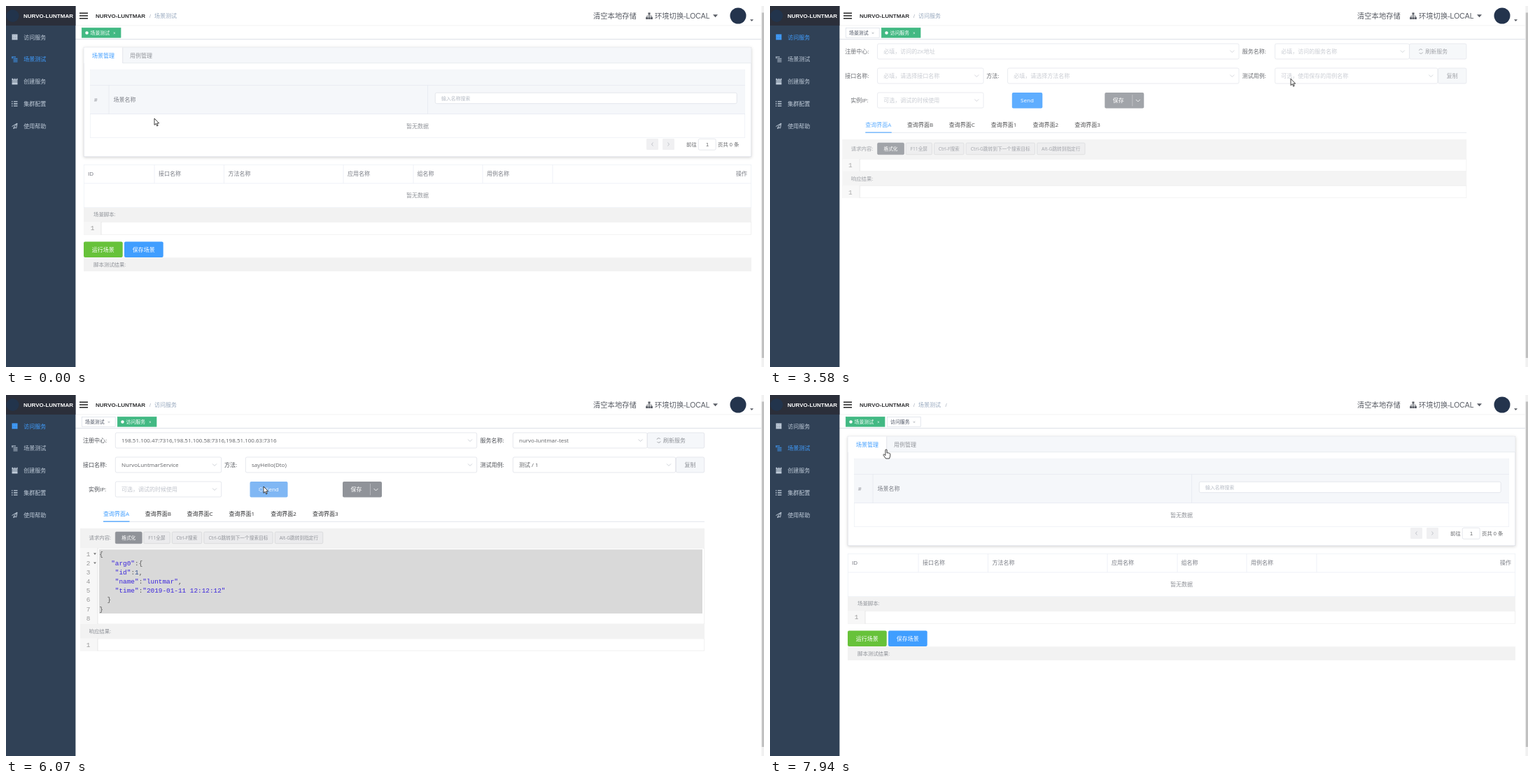
Animation of 1083x517 px, one loop 8 s. Source, as an HTML page:

```html
<!DOCTYPE html>
<html lang="zh-CN">
<head>
<meta charset="utf-8">
<title>场景测试</title>
<style>
html, body { margin: 0; width: 100%; height: 100%; overflow: hidden; background: #fff; }
svg { display: block; width: 100%; height: 100%; }
text { white-space: pre; }
.sans { font-family: "Liberation Sans", "Noto Sans CJK SC", "Noto Sans CJK", sans-serif; }
.form { font-family: "Open Sans", "Noto Sans CJK SC", "Noto Sans CJK", sans-serif; }
.mono { font-family: "Liberation Mono", monospace; }
</style>
</head>
<body>
<svg id="stage" viewBox="0 0 1083 517"></svg>
<script>
const NS = 'http://www.w3.org/2000/svg';
const LOOP = 8000, STEP = LOOP / 103;
const BLUE = '#409eff', GREY = '#909399', TEXT = '#606266', HINT = '#c0c4cc';
const LINE = '#ebeef5', BORDER = '#dcdfe6', PANEL = '#f2f2f2', PALE = '#f5f7fa';
const BRAND = 'NURVO-LUNTMAR';
const stage = document.getElementById('stage');

function el(tag, parent, attrs = {}) {
  const node = document.createElementNS(NS, tag);
  for (const k in attrs) node.setAttribute(k, attrs[k]);
  return parent.appendChild(node);
}
const group = (p, attrs) => el('g', p, attrs);
// Box given by its edges.
const box = (p, x1, y1, x2, y2, fill, attrs) =>
  el('rect', p, { x: x1, y: y1, width: x2 - x1, height: y2 - y1, fill, ...attrs });
const framed = (p, x1, y1, x2, y2, fill, stroke, rx = 0) =>
  box(p, x1 + .3, y1 + .3, x2 - .3, y2 - .3, fill, { stroke, 'stroke-width': .7, rx });
const path = (p, d, stroke, w = .8, attrs) =>
  el('path', p, { d, stroke, fill: 'none', 'stroke-width': w, ...attrs });
const solid = (p, d, fill) => el('path', p, { d, fill });
// Text whose vertical middle is y.
function label(p, x, y, str, size = 8, fill = TEXT, attrs) {
  const t = el('text', p, { x, y: y + size * .37, 'font-size': size, fill, ...attrs });
  t.textContent = str;
  return t;
}
const MID = { 'text-anchor': 'middle' }, END = { 'text-anchor': 'end' };
const show = (node, on) => node.setAttribute('display', on ? 'inline' : 'none');
const clamp = v => Math.max(0, Math.min(1, v));
const easeOut = v => 1 - Math.pow(1 - clamp(v), 2.4);
const cross = (p, x, y, stroke) =>
  path(p, `M${x - 1.2} ${y - 1.2}l2.4 2.4m0-2.4l-2.4 2.4`, stroke, .6);
const chevron = (p, x, y, dir = 1, stroke = HINT) =>
  path(p, `M${x - 3} ${y - 1.5 * dir}l3 ${3 * dir}l3 ${-3 * dir}`, stroke, .8);
const sideways = (p, x, y, dir, stroke = HINT) =>
  path(p, `M${x - dir} ${y - 2.5}l${2 * dir} 2.5l${-2 * dir} 2.5`, stroke, .8);

const defs = el('defs', stage);
const shadow = el('filter', defs, { id: 'soft', x: '-10%', y: '-10%', width: '120%', height: '130%' });
el('feDropShadow', shadow, { dx: 0, dy: 1, stdDeviation: 2, 'flood-color': '#000', 'flood-opacity': .18 });

/* ---------- scene page ---------- */
const scenePage = group(stage, { class: 'sans' });
(function buildScene(p) {
  const head = '#7b7e86';
  box(p, 111, 59, 1065, 216, '#fff', { filter: 'url(#soft)' });
  framed(p, 111, 59, 1065, 216, '#fff', BORDER);
  box(p, 111.6, 59.6, 1064.4, 82, PALE);
  path(p, 'M167 81.7H1064.5', '#e4e7ed');
  box(p, 111.6, 59.6, 166.6, 82, '#fff');
  path(p, 'M166.7 59.5V82', BORDER, .7);
  label(p, 123, 71, '场景管理', 8, BLUE);
  label(p, 177, 71, '用例管理', 8, GREY);

  framed(p, 120, 91, 1056, 189, '#fff', LINE);
  box(p, 120.5, 91.5, 1055.5, 154.6, PALE);
  path(p, 'M120 113.6H1056M120 154.6H1056M147 113.6V154.6M602.5 113.6V154.6', '#e6e9f0', .8);
  label(p, 126, 134, '#', 8, head);
  label(p, 153.5, 134, '场景名称', 8, head);
  framed(p, 613, 124, 1044.5, 140, '#fff', BORDER, 2);
  label(p, 622, 132, '输入名称搜索', 6.9, '#b4bac4');
  label(p, 588, 172, '暂无数据', 8, GREY, MID);
  for (const [x, dir] of [[915, -1], [938, 1]]) {
    box(p, x, 190, x + 17, 206, '#f0f0f2', { rx: 1 });
    sideways(p, x + 8.5, 198, dir, '#b4b8c0');
  }
  label(p, 972, 198.5, '前往', 7.4);
  framed(p, 989, 190, 1014.5, 206.5, '#fff', BORDER, 2);
  label(p, 1002, 198.5, '1', 7.4, TEXT, MID);
  label(p, 1017, 198, '页共 0 条', 7.4);

  framed(p, 111, 227, 1065, 289, '#fff', LINE);
  path(p, 'M111 254H1065' + [212, 311.5, 482, 582, 681, 781].map(x => `M${x} 227V254`).join(''), LINE);
  [[117, 'ID'], [218, '接口名称'], [317.5, '方法名称'], [488, '应用名称'], [587.5, '组名称'], [687, '用例名称']]
    .forEach(([x, s]) => label(p, x, 240.5, s, 8, head));
  label(p, 1059, 240.5, '操作', 8, head, END);
  label(p, 588, 271.5, '暂无数据', 8, GREY, MID);

  box(p, 111, 289, 1065, 309, PANEL);
  label(p, 125, 298.5, '场景脚本:', 7.4, GREY);
  editor(p, 111, 309, 1065, 327.5);
  lineNumber(p, 123.5, 318, 1);
  box(p, 111, 337.5, 166.7, 360, '#67c23a', { rx: 2 });
  label(p, 138.8, 349, '运行场景', 8, '#fff', MID);
  box(p, 169, 337.5, 224.7, 360, BLUE, { rx: 2 });
  label(p, 196.8, 349, '保存场景', 8, '#fff', MID);
  box(p, 111, 360.3, 1065, 380, PANEL);
  label(p, 125, 370, '脚本测试结果:', 7.4, GREY);
})(scenePage);

function editor(p, x1, y1, x2, y2) {
  framed(p, x1, y1, x2, y2, '#fff', '#ebebeb');
  box(p, x1, y1, x1 + 25, y2, '#f7f7f7');
  path(p, `M${x1 + 25} ${y1}V${y2}`, '#ddd', .7);
}
function lineNumber(p, x, y, n) {
  label(p, x, y, n, 9.4, '#999', { class: 'mono', ...MID });
}

/* ---------- request page ---------- */
const CHAR = 5.64, ROW = 13.1;
const REQUEST = ['{', '   "arg0":{', '    "id":1,', '    "name":"luntmar",',
  '    "time":"2019-01-11 12:12:12"', '  }', '}', ''];
const RESPONSE = ['{', '   "code":0,', '   "error":null,', '   "data":{', '    "name":"hello:luntmar",',
  '    "id":2,', '    "time":"2019-01-11 12:12:12",', '    "class":"com.nurvo.luntmar.api.Dto"',
  '  },', '   "elapse":2,', '   "needRetry":null', '}', ''];

function tint(token) {
  if (token[0] === '"') return '#3a24dc';
  if (token === 'null') return '#4a24c0';
  return /\d/.test(token) ? '#2a4a8a' : '#555';
}
function codeBlock(p, top, lines) {
  box(p, 133, top - 6.3, 995, top - 6.3 + ROW * (lines.length - 1), '#d9d9d9');
  lines.forEach((line, i) => {
    const y = top + i * ROW, indent = line.search(/\S|$/);
    lineNumber(p, i < 9 ? 117.5 : 115, y, i + 1);
    if (line.endsWith('{')) solid(p, `M125 ${y - 1.2}h4l-2 2.6z`, '#777');
    const t = label(p, 133.3 + indent * CHAR, y, '', 9.4, '#555', { class: 'mono' });
    for (const token of line.trim().match(/"[^"]*"|null|\d+|[{}:,]/g) || [])
      el('tspan', t, { fill: tint(token) }).textContent = token;
  });
}

const formPage = group(stage, { class: 'form' });
const form = {};
(function buildForm(p) {
  const select = (x1, y, x2) => {
    framed(p, x1, y - 11.3, x2, y + 11.3, '#fff', BORDER, 2);
    chevron(p, x2 - 10, y);
  };
  [[110, 65, '注册中心:'], [677.5, 65, '服务名称:'], [110, 100, '接口名称:'], [312, 100, '方法:'],
    [677.5, 100, '测试用例:'], [118, 135, '实例IP:']].forEach(([x, y, s]) => label(p, x, y, s, 8, '#4e5157'));
  select(156, 65, 673);
  select(724, 65, 916.5);
  select(156, 100, 308);
  select(342, 100, 673);
  select(156, 135, 308);
  framed(p, 916, 53.7, 998, 76.3, PALE, BORDER, 2);
  path(p, 'M930 63.7a2.6 2.6 0 0 1 4.8-.6M935.2 66.3a2.6 2.6 0 0 1-4.8.6', GREY, .8);
  label(p, 939, 65, '刷新服务', 8, GREY);
  framed(p, 957, 88.7, 998, 111.3, PALE, BORDER, 2);
  label(p, 977.5, 100, '复制', 8, GREY, MID);
  label(p, 165, 135, '可选，调试的时候使用', 8, HINT);

  form.empty = group(p);
  form.filled = group(p);
  [[165, 65, '必填，访问的ZK地址', '198.51.100.47:7316,198.51.100.58:7316,198.51.100.63:7316'],
    [733, 65, '必填，访问的服务名称', 'nurvo-luntmar-test'],
    [165, 100, '必填，请选择接口名称', 'NurvoLuntmarService'],
    [351, 100, '必填，请选择方法名称', 'sayHello(Dto)']].forEach(([x, y, hint, value]) => {
    label(form.empty, x, y, hint, 8, HINT);
    label(form.filled, x, y, value);
  });
  form.caseBox = framed(p, 724, 88.7, 957, 111.3, 'none', BORDER, 2);
  form.caseDown = chevron(p, 947, 100);
  form.caseUp = chevron(p, 947, 100, -1);
  label(form.empty, 733, 100, '可选，使用保存的用例名称', 8, HINT);
  label(form.filled, 733, 100, '测试 / 1');
  form.caret = path(p, 'M733.3 95V105.5', '#333', .8);

  form.send = group(p);
  box(form.send, 348.5, 124, 392, 146.5, BLUE, { rx: 2 });
  label(form.send, 370.2, 135, 'Send', 8, '#fff', MID);
  form.busy = group(p);
  box(form.busy, 348.5, 124, 402.5, 146.5, '#80b7f4', { rx: 2 });
  form.spinner = el('circle', form.busy, { cx: 364.5, cy: 135.3, r: 2.7, fill: 'none', stroke: '#fff',
    'stroke-width': 1.2, 'stroke-dasharray': '1 1.12' });
  label(form.busy, 371, 135, 'Send', 8, '#fff');

  box(p, 481, 124, 537, 146.5, GREY, { rx: 2 });
  path(p, 'M520.5 127V143.5', '#c3c5c9', .7);
  label(p, 500.5, 135, '保存', 8, '#fff', MID);
  chevron(p, 528.5, 135.5, 1, '#fff');

  path(p, 'M139 181.4H998', '#e4e7ed', 1);
  path(p, 'M139 181.2H176.5', BLUE, 1.2);
  ['A', 'B', 'C', '1', '2', '3'].forEach((s, i) =>
    label(p, 139 + i * 59.8, 170.5, '查询界面' + s, 8, i ? '#303133' : BLUE));

  box(p, 106, 191, 998, 219, PANEL);
  label(p, 118.5, 204, '请求内容:', 7.4, GREY);
  [[156, 194.5, '格式化'], [196.5, 234.5, 'F11全屏'], [237, 280, 'Ctrl-F搜索'],
    [282.5, 381.5, 'Ctrl-G跳转到下一个搜索目标'], [384, 453, 'Alt-G跳转到指定行']].forEach(([a, b, s], i) => {
    framed(p, a, 195.8, b, 213, i ? '#ebebed' : GREY, i ? '#d3d4d6' : GREY, 1.5);
    label(p, (a + b) / 2, 204.4, s, 6.7, i ? GREY : '#fff', MID);
  });

  form.blank = group(p);
  editor(form.blank, 106, 219, 998, 236.7);
  lineNumber(form.blank, 117.5, 227.5, 1);
  form.body = group(p);
  editor(form.body, 106, 219, 998, 328.3);
  codeBlock(form.body, 227.5, REQUEST);

  form.result = group(p);
  box(form.result, 106, 236.7, 998, 257.3, PANEL);
  label(form.result, 118.5, 247, '响应结果:', 7.4, GREY);
  editor(form.result, 106, 257.3, 998, 275);
  form.resultOne = group(form.result);
  lineNumber(form.resultOne, 117.5, 266.3, 1);
  form.reply = group(p);
  editor(form.reply, 106, 348.8, 998, 530);
  codeBlock(form.reply, 357.7, RESPONSE);

  form.menu = group(p);
  form.sub = group(form.menu);
  box(form.sub, 815, 118.5, 907, 235, '#fff', { filter: 'url(#soft)' });
  box(form.menu, 724.5, 118.5, 815.5, 235, '#fff', { filter: 'url(#soft)' });
  form.subFront = group(form.menu);
  framed(form.subFront, 815, 118.5, 907, 235, '#fff', '#e4e7ed', 1);
  label(form.subFront, 827, 132, '1', 8, BLUE);
  framed(form.menu, 724.5, 118.5, 815.8, 235, '#fff', '#e4e7ed', 1);
  box(form.menu, 725, 122.5, 815.3, 141.8, PALE);
  form.firstItem = label(form.menu, 736.5, 132.3, '测试');
  label(form.menu, 736.5, 151.7, '基础服务');
  sideways(form.menu, 802.5, 132, 1);
  sideways(form.menu, 802.5, 151.5, 1);
})(formPage);

/* ---------- frame around the pages ---------- */
const chrome = group(stage, { class: 'sans' });
box(chrome, 99, 0, 1083, 48, '#fff');
path(chrome, 'M99 28H1079', '#ececec', .7);
path(chrome, 'M99 47.6H1079', '#d8dce5', .9);
path(chrome, 'M105 10.3H117M105 14H117M105 17.7H117', '#222', 1.4);
label(chrome, 128, 14.2, BRAND, 8, '#303133', { 'font-weight': 'bold' });
label(chrome, 204.8, 14.2, '/', 8, '#a5adba');
const crumb = label(chrome, 212, 14.2, '', 8, '#97a8be');
const crumbSlash = label(chrome, 250.5, 14.2, '/', 8, '#a5adba');
label(chrome, 839, 14, '清空本地存储', 10.3, '#5a5e66');
path(chrome, 'M919 11V17M915.7 17V14.3H922.6V17', '#5a5e66', .8);
[[917.5, 9.5], [914.2, 16], [917.5, 16], [920.9, 16]].forEach(([x, y]) => box(chrome, x, y, x + 3, y + 3, '#5a5e66'));
label(chrome, 927, 14, '环境切换-LOCAL', 10.3, '#5a5e66');
solid(chrome, 'M1010 12.2H1017L1013.5 16.3z', '#5a5e66');
el('circle', chrome, { cx: 1046, cy: 14, r: 11.5, fill: '#24344d' });
solid(chrome, 'M1063 19.2H1068L1065.5 22z', '#5a5e66');

function tag(x, active, title) {
  const g = group(chrome), tx = x + (active ? 12.5 : 5), right = x + (active ? 56.3 : 48.5);
  framed(g, x, 31, right, 45.5, active ? '#42b983' : '#fff', active ? '#42b983' : '#d8dce5');
  if (active) el('circle', g, { cx: x + 7.5, cy: 38.5, r: 2.2, fill: '#fff' });
  label(g, tx, 38.3, title, 6.9, active ? '#fff' : '#495060');
  return { g, x: cross(g, right - 9.5, 38.7, active ? '#fff' : '#9aa0a8') };
}
const SCENE = '场景测试', VISIT = '访问服务';
const tags = {
  sceneOn: tag(108, true, SCENE), sceneOff: tag(108, false, SCENE),
  visitOn: tag(159, true, VISIT), visitOff: tag(167, false, VISIT)
};

box(chrome, 0, 0, 99.4, 517, '#304156');
box(chrome, 0, 0, 99.4, 28, '#2b2f3a');
el('circle', chrome, { cx: 9.5, cy: 14, r: 9, fill: '#22344c' });
label(chrome, 25, 14.2, BRAND, 8, '#fff', { 'font-weight': 'bold' });
const hover = box(chrome, 0, 28, 99.4, 60, '#263445');
const ICONS = [
  'M8.5 41.4h8M8.5 44.3h8M8.5 47.2h8M9.7 40.4v8M12.5 40.4v8M15.3 40.4v8',
  'M8 73h6M10.5 75.3h6M10.5 77.5h6M10.5 79.8h6M9 73v2.5',
  'M8.5 106h8M8.5 108h8M8.5 110h8M8.5 111.6h8M8.5 104.6h2M12 104.6h1.5M15 104.6h1.5',
  'M8 136.8h1.5M11 136.8h5.5M8 140h1.5M11 140h5.5M8 143.2h1.5M11 143.2h5.5',
  'M8.5 172.5L16 168L14.7 175L11.5 173.4L15.5 168.6M11 173.5V176L12.5 174'
];
const WIDTHS = [2, 1, 1.7, 1.3, 1];
const menuItems = [VISIT, SCENE, '创建服务', '集群配置', '使用帮助'].map((title, i) => ({
  icon: path(chrome, ICONS[i], '#bfcbd9', WIDTHS[i]),
  text: label(chrome, 25.3, 44.7 + 31.8 * i, title, 8, '#bfcbd9')
}));
box(chrome, 1079.3, 0, 1083, 517, '#f1f1f1');
box(chrome, 1079.8, 9.5, 1083, 504, '#c1c1c1');
const bar = box(chrome, 0, 0, 1, 1.2, '#2299dd');

/* ---------- pointer ---------- */
const arrow = el('path', stage, { d: 'M0 0V9.4L2.2 7.4L3.7 10.9L5.2 10.2L3.7 6.9H6.6z',
  fill: '#fff', stroke: '#111', 'stroke-width': .8 });
const hand = el('path', stage, {
  d: 'M-1.1 1.1a1.1 1.1 0 0 1 2.2 0V5q.9-.6 1.8.1q.9-.4 1.6.4q1.2-.2 1.2 1.1V9.5L4.6 13H-.6L-3.9 8.4q-.6-1.2.5-1.5q.9-.1 2.3 1.7z',
  fill: '#fff', stroke: '#111', 'stroke-width': .8 });
const TRACK = [[0, 212, 161], [840, 52, 59], [920, 52, 44], [1000, 52, 48], [1160, 52, 48], [1240, 49, 74],
  [1310, 47, 67], [1400, 47, 67], [1540, 42, 67], [1630, 42, 67], [1710, 40, 74], [1864, 36, 76],
  [2010, 21, 75], [2240, 54, 76], [2330, 54, 76], [2700, 53, 42], [2870, 52, 44], [3110, 52, 44],
  [3640, 776, 107], [3730, 777, 111], [3960, 777, 111], [4270, 774, 125], [4510, 774, 125],
  [4660, 829, 128], [4820, 829, 128], [5500, 368, 131], [6400, 368, 131], [6760, 300, 386],
  [7210, 52, 66], [7300, 53, 73], [7480, 53, 73], [7920, 166, 78]];

function pointerAt(t) {
  const i = TRACK.findIndex(k => k[0] > t);
  if (i < 0) return TRACK[TRACK.length - 1].slice(1);
  const [t0, x0, y0] = TRACK[i - 1], [t1, x1, y1] = TRACK[i];
  const u = (t - t0) / (t1 - t0), s = u * u * (3 - 2 * u);
  return [x0 + (x1 - x0) * s, y0 + (y1 - y0) * s];
}

/* ---------- timeline ---------- */
const TO_FORM = { at: 2870, leave: 500, enter: 380 };
const TO_SCENE = { at: 7460, leave: 220, enter: 220 };
const OPEN = 3880, EXPAND = 4190, PICK = 4740, BODY = 4960, SEND = 5590, REPLY = 6200;

function place(page, opacity, dx) {
  show(page, opacity > 0);
  page.setAttribute('opacity', opacity);
  page.setAttribute('transform', `translate(${dx} 0)`);
}
function swap(t, { at, leave, enter }, from, to) {
  const out = easeOut((t - at) / leave), into = easeOut((t - at - leave) / enter);
  place(from, 1 - out, 17 * out);
  place(to, into, -17 * (1 - into));
}

function drawNavigation(t, x, y) {
  const visiting = t >= 2870 && t < 7450;
  const settling = t >= 2870 && t < 3100, leaving = t >= 7450 && t < 7600;
  const opened = t >= 2870;
  show(tags.sceneOn.g, !visiting);
  show(tags.sceneOff.g, visiting);
  show(tags.visitOn.g, visiting);
  show(tags.visitOff.g, opened && !visiting);
  show(tags.sceneOff.x, !settling);
  show(tags.sceneOn.x, !leaving);
  show(tags.visitOff.x, !leaving);

  const onForm = t >= 3180 && t < 7680;
  crumb.textContent = onForm ? VISIT : SCENE;
  show(crumbSlash, (t >= 2870 && t < 3180) || t >= 7680);

  const blue = [opened && t < 7680, !onForm];
  menuItems.forEach((m, i) => {
    const color = blue[i] ? BLUE : '#bfcbd9';
    m.icon.setAttribute('stroke', color);
    m.text.setAttribute('fill', color);
  });
  const row = Math.floor((y - 28) / 32);
  const over = x < 99 && row >= 0 && row < 5;
  show(hover, over);
  hover.setAttribute('y', 28 + row * 32);

  const late = t > 7000;
  const fill = late ? (t - 7500) / 260 : .1 + (t - 2870) / 310;
  const fade = late ? (t - 7760) / 140 : (t - 3250) / 200;
  show(bar, (late ? t > 7500 : opened) && fade < 1);
  bar.setAttribute('width', 1079 * clamp(fill));
  bar.setAttribute('opacity', 1 - clamp(fade));
  return over;
}

function drawForm(t) {
  const picked = t >= PICK, hasBody = t >= BODY, replied = t >= REPLY;
  const focused = t >= OPEN && !picked, busy = t >= SEND && !replied;
  show(form.empty, !picked);
  show(form.filled, picked);
  form.caseBox.setAttribute('stroke', focused ? BLUE : BORDER);
  show(form.caseDown, !focused);
  show(form.caseUp, focused);
  show(form.caret, focused);

  const grow = easeOut((t - OPEN) / 300), gone = clamp((t - PICK) / 230);
  const expanded = t >= EXPAND;
  show(form.menu, t >= OPEN && gone < 1);
  form.menu.setAttribute('opacity', grow * (1 - gone));
  form.menu.setAttribute('transform', `translate(0 ${118 * (1 - grow)}) scale(1 ${grow})`);
  show(form.sub, expanded);
  show(form.subFront, expanded);
  form.firstItem.setAttribute('fill', expanded ? BLUE : TEXT);

  show(form.blank, !hasBody);
  show(form.body, hasBody);
  form.result.setAttribute('transform', `translate(0 ${hasBody ? 91.4 : 0})`);
  show(form.resultOne, !replied);
  show(form.reply, replied);
  show(form.send, !busy);
  show(form.busy, busy);
  form.spinner.setAttribute('transform', `rotate(${t * .18 % 360} 364.5 135.3)`);
}

function draw(time) {
  const t = Math.floor((time % LOOP) / STEP) * STEP;
  const [x, y] = pointerAt(t);
  if (t < 7000) swap(t, TO_FORM, scenePage, formPage);
  else swap(t, TO_SCENE, formPage, scenePage);
  drawForm(t);
  const overMenu = drawNavigation(t, x, y);
  const pointing = overMenu || (t > 3600 && t < 4900) || (t > 5440 && t < SEND) || t > 7840;
  show(hand, pointing);
  show(arrow, !pointing);
  for (const c of [hand, arrow]) c.setAttribute('transform', `translate(${x} ${y})`);
}

const start = performance.now();
function tick() {
  draw(performance.now() - start);
  requestAnimationFrame(tick);
}
tick();
</script>
</body>
</html>
```
